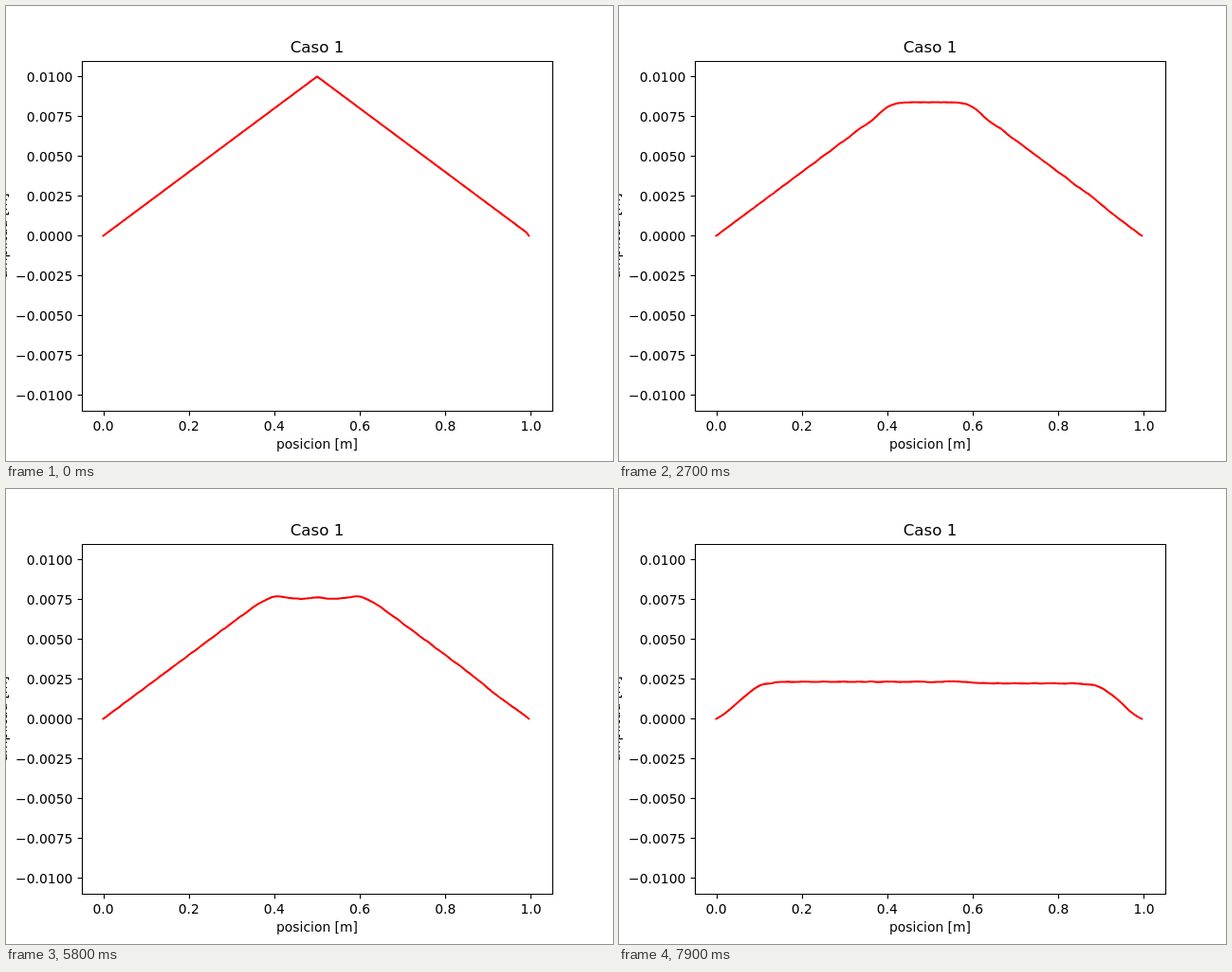
An HTML page for the animation above (8000 ms loop, 640 px wide and 480 px high).

```html
<!DOCTYPE html>
<html lang="es">
<head>
<meta charset="utf-8">
<title>Caso 1</title>
<style>
  html, body { margin: 0; width: 100%; height: 100%; overflow: hidden; background: #fff; }
  svg { display: block; width: 640px; height: 480px; }
  text { font: 13.89px "DejaVu Sans", sans-serif; fill: #000; }
  .title { font-size: 16.67px; }
  .axis { fill: none; stroke: #000; stroke-width: 1.11; }
  .string { fill: none; stroke: #f00; stroke-width: 2.083; stroke-linecap: square; stroke-linejoin: round; }
</style>
</head>
<body>
<svg viewBox="0 0 640 480">
  <g id="axes"></g>
  <path id="string" class="string"/>
</svg>
<script>
const FRAME_MS = 100, FRAMES = 80;
const POINTS = 200, DX = 0.005, HEIGHT = 0.01;
const STEPS = 100, COURANT_SQ = 0.02;

const px = x => 80 + (x + 0.05) * 496 / 1.1;
const py = y => 242.4 - y * 16800;
const snap = v => Math.floor(v + 0.5) + 0.5;

const axes = document.getElementById('axes');
const string = document.getElementById('string');

function add(tag, attrs, content = '') {
  const el = document.createElementNS('http://www.w3.org/2000/svg', tag);
  for (const key in attrs) el.setAttribute(key, attrs[key]);
  el.textContent = content;
  axes.append(el);
}
const line = d => add('path', { class: 'axis', d });
const label = (content, x, y, anchor = 'middle', extra = {}) =>
  add('text', { x, y, 'text-anchor': anchor, ...extra }, content);

function drawAxes() {
  line('M80.5 58.5H576.5V427.5H80.5Z');
  for (let i = 0; i <= 5; i++) {
    const x = px(i / 5);
    line(`M${snap(x)} 427.5v4.9`);
    label((i / 5).toFixed(1), x, 448);
  }
  for (let i = -4; i <= 4; i++) {
    const value = i * 0.0025, y = py(value);
    line(`M80.5 ${snap(y)}h-4.9`);
    label(value.toFixed(4).replace('-', '\u2212'), 70.3, Math.round(y + 5.28), 'end');
  }
  label('Caso 1', 328, 49, 'middle', { class: 'title' });
  label('posicion [m]', 328, 467);
  label('amplitud [m]', 0, 0, 'middle', { transform: 'translate(1 242.4) rotate(-90)' });
}

const toPath = y =>
  'M' + Array.from(y, (v, i) => `${px(i * DX).toFixed(2)} ${py(v).toFixed(2)}`).join('L');

// Plucked string with fixed ends, integrated by finite differences.
function simulate() {
  let now = Float64Array.from({ length: POINTS }, (_, i) =>
    i === POINTS - 1 ? 0 : 2 * HEIGHT * Math.min(i * DX, 1 - i * DX));
  let before = now.slice();
  const bend = i => COURANT_SQ * (now[i + 1] - 2 * now[i] + now[i - 1]);
  for (let i = 1; i < POINTS - 1; i++) before[i] += bend(i) / 2;

  const paths = [];
  for (let frame = 0; frame < FRAMES; frame++) {
    paths.push(toPath(now));
    for (let step = 0; step < STEPS; step++) {
      for (let i = 1; i < POINTS - 1; i++) before[i] = 2 * now[i] - before[i] + bend(i);
      [before, now] = [now, before];
    }
  }
  return paths;
}

drawAxes();
const paths = simulate();
const start = performance.now();

function render() {
  const t = Math.max(0, performance.now() - start);
  string.setAttribute('d', paths[Math.floor(t / FRAME_MS) % FRAMES]);
  requestAnimationFrame(render);
}
render();
</script>
</body>
</html>
```
